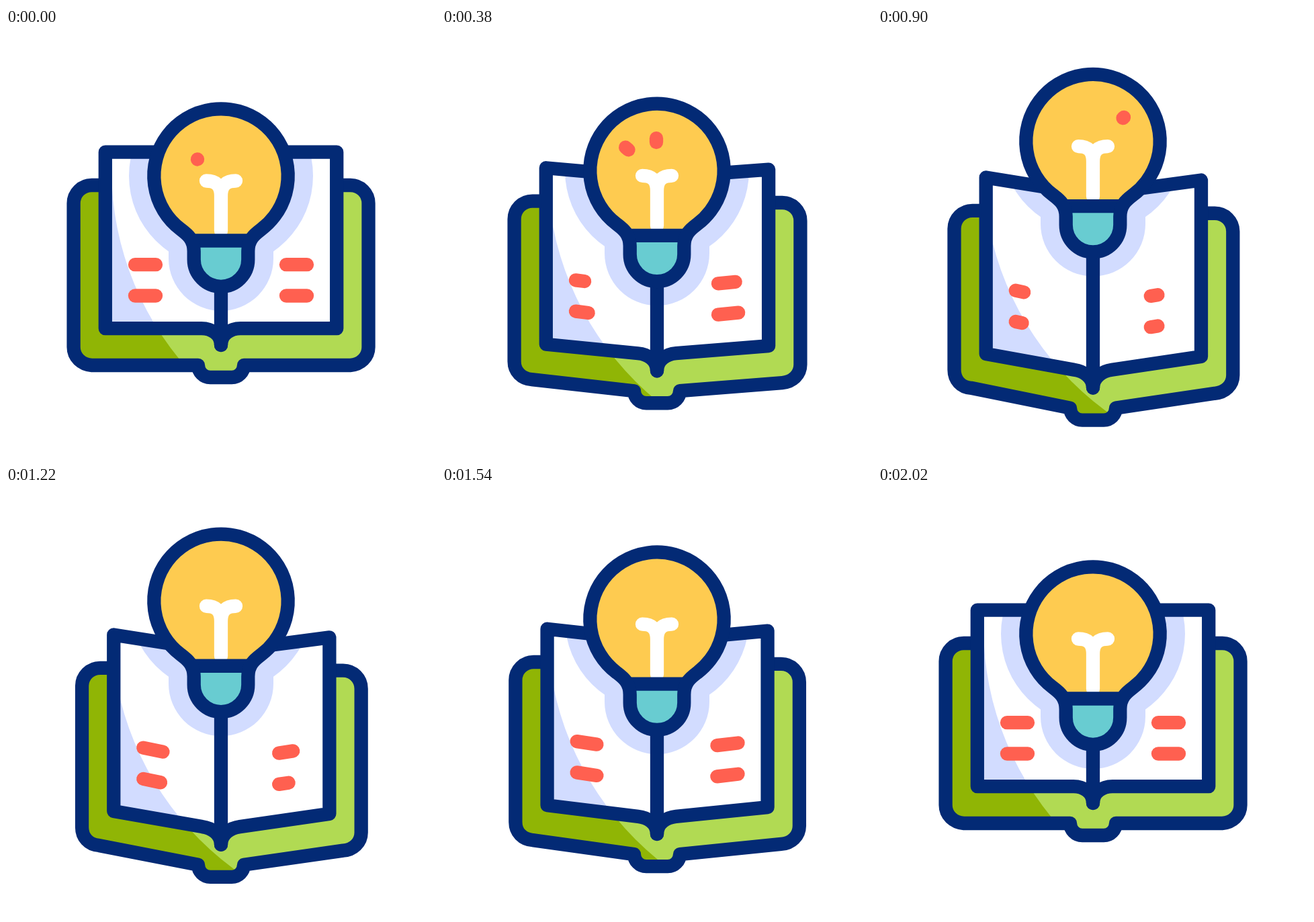
These frames come from a looping animation (640 px wide and 640 px high, 2.22 s). An HTML page with a canvas:

```html
<!DOCTYPE html>
<html lang="en">
<head>
<meta charset="utf-8">
<title>Book of ideas</title>
<style>
html, body { margin: 0; width: 100%; height: 100%; overflow: hidden; background: #fff; }
canvas { display: block; width: 100vw; height: 100vh; object-fit: contain; }
</style>
</head>
<body>
<canvas id="stage" width="640" height="640"></canvas>
<script>
const ctx = document.getElementById('stage').getContext('2d');
const LOOP = 2220, MID = 1000, LINE = 20.3;
const NAVY = '#032a75', LIME = '#b1da53', GREEN = '#90b505', YELLOW = '#fecb50',
      TEAL = '#68ccd1', RED = '#ff6050', PALE = '#d2dcff', WHITE = '#fff';

const clamp = v => Math.max(0, Math.min(1, v));
const smooth = (t, a, b) => { const p = clamp((t - a) / (b - a)); return p * p * (3 - 2 * p); };

// cubic-bezier(.3, 0, .25, 1), solved by bisection
function ease(x) {
  if (x <= 0) return 0;
  if (x >= 1) return 1;
  let lo = 0, hi = 1;
  for (let i = 0; i < 24; i++) {
    const s = (lo + hi) / 2, r = 1 - s;
    if (0.9 * s * r * r + 0.75 * s * s * r + s * s * s < x) lo = s; else hi = s;
  }
  return lo * lo * (3 - 2 * lo);
}

function stroke(path, color = NAVY) {
  ctx.strokeStyle = color;
  ctx.lineWidth = LINE;
  ctx.lineCap = ctx.lineJoin = 'round';
  ctx.stroke(path);
}

function fill(path, color, rule) {
  ctx.fillStyle = color;
  ctx.fill(path, rule || 'nonzero');
}

function segment(x1, y1, x2, y2, color) {
  const p = new Path2D();
  p.moveTo(x1, y1);
  p.lineTo(x2, y2);
  stroke(p, color);
}

function clipped(path, draw) {
  ctx.save();
  ctx.clip(path);
  draw();
  ctx.restore();
}

// Shadow edge: everything outside one large fixed circle
const shade = new Path2D();
shade.rect(0, 0, 640, 640);
shade.arc(604, 210, 447, 0, 2 * Math.PI);

const glow = new Path2D();
glow.arc(320, 220, 137, 0, 2 * Math.PI);
glow.moveTo(242, 300);
glow.lineTo(398, 300);
glow.lineTo(398, 343);
glow.arc(320, 343, 78, 0, Math.PI);
glow.closePath();

const bulb = new Path2D();
bulb.moveTo(279.7, 344.5);
bulb.lineTo(279.7, 332);
bulb.bezierCurveTo(279.7, 314, 269, 306.5, 260, 299.6);
bulb.arc(320, 220, 99.7, Math.atan2(79.6, -60), Math.atan2(79.6, 60));
bulb.bezierCurveTo(371, 306.5, 360.3, 314, 360.3, 332);
bulb.lineTo(360.3, 344.5);
bulb.arc(320, 344.5, 40.3, 0, Math.PI);
bulb.closePath();

const filament = new Path2D();
for (const s of [-1, 1]) {
  filament.moveTo(320 + 22 * s, 227.5);
  filament.bezierCurveTo(320 + 8 * s, 227.5, 320, 234, 320, 250);
}
filament.lineTo(320, 302);

function bookPaths(g, drop) {
  const gx = Math.pow(g, 1.2), gy = Math.pow(g, 0.93);
  const left = (x, y) => [x + 13 * gx, y + 38 * gy];
  const low = (x, y) => [x + 11 * gx, y + 34 * gy];
  const right = (x, y) => [x - 11.3 * gx, y + 42 * gy];

  const cover = new Path2D();
  cover.moveTo(...left(165, 234));
  cover.lineTo(...left(127.6, 234));
  cover.bezierCurveTo(...left(112.6, 234), ...left(100.6, 246), ...left(100.6, 261));
  cover.lineTo(...left(100.6, 475 - 4 * g));
  cover.bezierCurveTo(...left(100.6, 490 - 4 * g), ...low(112.6, 501), ...low(127.6, 502));
  cover.lineTo(286, 502 + drop);
  cover.arc(304, 502 + drop, 18, Math.PI, Math.PI / 2, true);
  cover.arc(336, 502 + drop, 18, Math.PI / 2, 0, true);
  cover.lineTo(...right(512.5, 502));
  cover.bezierCurveTo(...right(527.5, 501), ...right(539.5, 490), ...right(539.5, 475));
  cover.lineTo(...right(539.5, 261));
  cover.bezierCurveTo(...right(539.5, 246), ...right(527.5, 234), ...right(512.5, 234));
  cover.lineTo(...right(475, 234));

  const page = new Path2D();
  page.moveTo(...left(147.8, 184.7));
  page.lineTo(320, 184.7 + drop);
  page.lineTo(...right(492.2, 184.7));
  page.lineTo(...right(492.2, 447.2));
  page.lineTo(349 - g, 447.2 + drop - 2 * g);
  page.bezierCurveTo(334, 447.2 + drop, 320, 456 + drop, 320, 472 + drop);
  page.bezierCurveTo(320, 456 + drop, 306, 447.2 + drop, 291 + g, 447.2 + drop - 2 * g);
  page.lineTo(...left(147.8, 447.2));
  page.closePath();
  return { cover, page };
}

function drawText(t, g) {
  const gx = Math.pow(g, 1.2);
  for (let i = 0; i < 4; i++) {
    const onRight = i > 1, y = 352.2 + (i % 2) * 46.3, lt = t - 100 * i;
    const size = 1 - 0.66 * (smooth(lt, 20, 500) - smooth(lt, 800, 1240));
    const x1 = onRight ? 417 - 11.3 * gx : 192 + 12.8 * gx;
    const x2 = onRight ? 448 - 11 * gx : 223 + 11 * gx;
    const y1 = y + (onRight ? 47 : 38.7) * g;
    const y2 = y + (onRight ? 42 : 45) * g;
    segment(x1, y1, x1 + (x2 - x1) * size, y1 + (y2 - y1) * size, RED);
  }
}

// Three short rays run outwards, one after another
function drawRays(t) {
  const rays = [[-34, -24.5, -48, -36.5], [0, -40, 0, -58], [34, -24.5, 48, -36.5]];
  rays.forEach(([x1, y1, x2, y2], i) => {
    const rt = t - 200 * i;
    const head = 0.93 * (1 - Math.pow(1 - clamp(rt / 450), 1.3));
    const tail = Math.pow(clamp((rt - 90) / 480), 1.25);
    if (head <= tail) return;
    const at = k => [319 + x1 + (x2 - x1) * k, 220 + y1 + (y2 - y1) * k];
    segment(...at(tail), ...at(head), RED);
  });
}

function drawBulb(t) {
  fill(bulb, YELLOW);
  clipped(bulb, () => {
    ctx.fillStyle = TEAL;
    ctx.fillRect(270, 316, 100, 80);
  });
  stroke(filament, WHITE);
  segment(281, 316.5, 359, 316.5, NAVY);
  stroke(bulb);
  drawRays(t);
}

function draw(t) {
  const m = t < MID ? t : 2 * MID - t;
  const g = ease(m / MID), drop = 64 * g;
  const rise = drop - 116 * ease((m - 135) / 865);
  const { cover, page } = bookPaths(g, drop);

  ctx.fillStyle = WHITE;
  ctx.fillRect(0, 0, 640, 640);

  fill(cover, LIME);
  clipped(cover, () => fill(shade, GREEN, 'evenodd'));
  stroke(cover);

  fill(page, WHITE);
  clipped(page, () => {
    fill(shade, PALE, 'evenodd');
    ctx.translate(0, rise);
    fill(glow, PALE);
  });
  drawText(t, g);
  stroke(page);
  segment(320, 350 + rise, 320, 472 + drop, NAVY);

  ctx.save();
  ctx.translate(0, rise);
  drawBulb(t);
  ctx.restore();
}

const start = performance.now();
function tick() {
  draw((performance.now() - start) % LOOP);
  requestAnimationFrame(tick);
}
tick();
</script>
</body>
</html>
```
